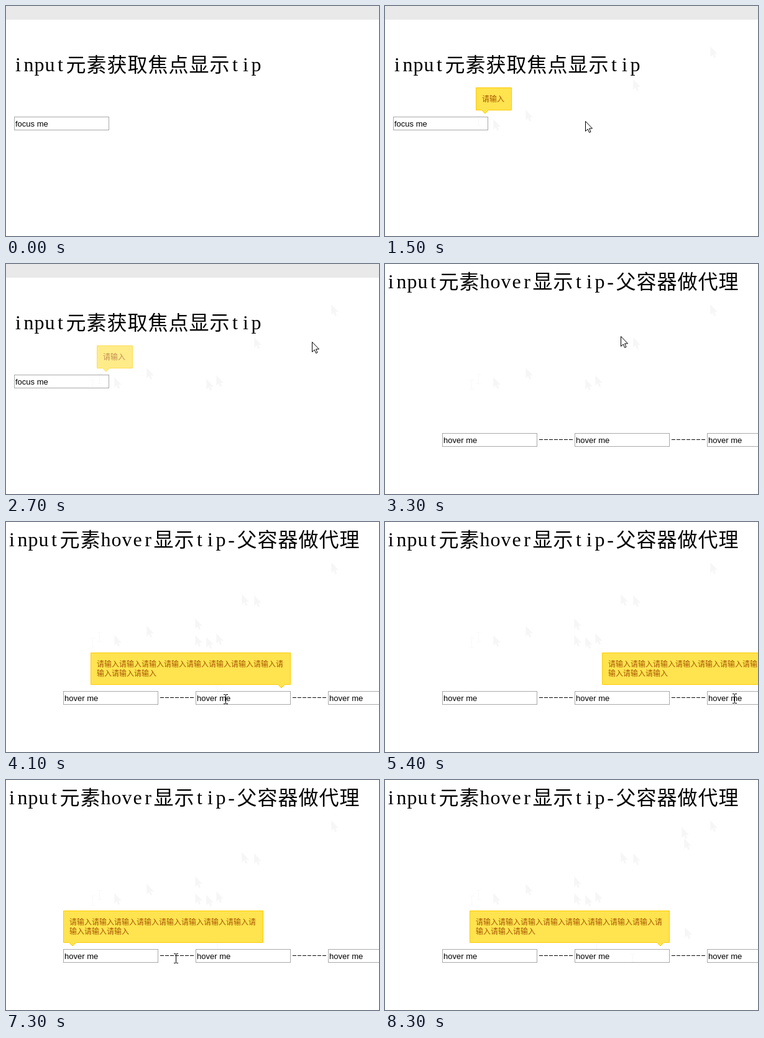
Animation of 600x370 px, one loop 8.8 s. Source, as an HTML page:

```html
<!DOCTYPE html>
<html lang="zh-CN">
<head>
<meta charset="utf-8">
<title>input tip</title>
<style>
html, body { margin: 0; width: 100%; height: 100%; overflow: hidden; background: #fff; }
svg { display: block; width: 600px; height: 370px; }
.title { font: 32px "Liberation Serif", "Noto Serif", serif; text-anchor: middle; }
.title .han { font: 32px "Noto Sans CJK SC", "Noto Sans CJK", sans-serif; }
.field rect { fill: #fff; stroke: #a9a9a9; }
.field text { font: 13px "Liberation Sans", Arial, sans-serif; }
.dash { stroke: #000; stroke-dasharray: 6 2; }
.tip path { fill: #ffe34f; stroke: #fc0; }
.tip text { font: 12px "Noto Sans CJK SC", "Noto Sans CJK", sans-serif; fill: #a65600; }
.ring { fill: none; stroke: #e5a83c; stroke-width: 2; }
.arrow { fill: #fff; stroke: #000; }
.beam { fill: none; stroke: #000; }
#ghosts { mix-blend-mode: multiply; }
#ghosts .arrow { fill: #f6f6f6; stroke: #f9f9f9; }
#ghosts .beam { stroke: #f8f8f8; }
</style>
</head>
<body>
<svg viewBox="0 0 600 370">
  <defs>
    <path id="arrow" d="M.5 .5V16.5L4.2 13L6.6 18.5L9 17.5L6.6 12H11.5Z"/>
    <path id="beam" d="M1 .5H4M5 .5H8M4.5 1V15M1 15.5H4M5 15.5H8"/>
  </defs>
  <rect width="600" height="370" fill="#fff"/>
  <g id="page1">
    <rect width="600" height="22" fill="#e9e9e9"/>
    <g class="title" data-x="11" data-y="105">input元素获取焦点显示tip</g>
    <g class="field" data-x="13" data-y="178">focus me</g>
    <rect id="ring" class="ring" x="13" y="178" width="153" height="22" rx="1"/>
    <g id="tip1" class="tip">
      <path d="M146.5 131.5H203.5V167.5H166.5L161 173L155.5 167.5H146.5Z"/>
      <text x="156" y="153.5">请输入</text>
    </g>
  </g>
  <g id="page2">
    <g class="title" data-x="1" data-y="39">input元素hover显示tip-父容器做代理</g>
    <g class="field" data-x="92" data-y="272">hover me</g>
    <path class="dash" d="M248 282.5H303M461 282.5H516"/>
    <g class="field" data-x="305" data-y="272">hover me</g>
    <g class="field" data-x="518" data-y="272">hover me</g>
    <g id="tip2" class="tip">
      <path id="bubble"/>
      <text x="10" y="232.5">请输入请输入请输入请输入请输入请输入请输入请输入请</text>
      <text x="10" y="247.5">输入请输入请输入</text>
    </g>
  </g>
  <g id="ghosts"></g>
  <g id="cursor"></g>
</svg>
<script>
const LOOP = 8800, CUT = 3300, STEP = 100;
const $ = id => document.getElementById(id);

function add(parent, tag, attrs, text) {
  const el = document.createElementNS("http://www.w3.org/2000/svg", tag);
  for (const k in attrs) el.setAttribute(k, attrs[k]);
  if (text) el.textContent = text;
  parent.append(el);
  return el;
}

// Full-width glyphs take 33px cells, half-width ones 17px.
document.querySelectorAll(".title").forEach(g => {
  const runs = g.textContent.match(/[ -~]+|[^ -~]+/g);
  let x = +g.dataset.x;
  g.textContent = "";
  for (const run of runs) {
    const han = run.charCodeAt(0) > 255, cell = han ? 33 : 17;
    const xs = [...run].map((_, i) => x + cell * (i + .5));
    add(g, "text", { x: xs.join(" "), y: +g.dataset.y + (han ? .5 : 0), class: han ? "han" : "" }, run);
    x += cell * run.length;
  }
});

document.querySelectorAll(".field").forEach(g => {
  const label = g.textContent, x = +g.dataset.x, y = +g.dataset.y;
  g.textContent = "";
  add(g, "rect", { x: x + .5, y: y + .5, width: 152, height: 21 });
  add(g, "text", { x: x + 2, y: y + 16 }, label);
});

// Pointer stops: time, x, y, shape (A arrow, B text beam, - hidden), * leaves a faint trace.
const stops = `100 523 65 A*|200 399 118 A*|300 226 167 A*|400 174 182 A*|500 150 176 B|600 146 177 B*
1300 215 190 A|1400 300 199 A|1500 322 185 A*|1700 290 199 A|1800 225 196 A|1900 175 190 A|2000 150 186 B
2100 135 186 B*|2400 230 185 A|2500 338 179 A*|2600 430 150 A|2700 492 125 A
3300 379 116 A*|3400 304 155 A*|3500 304 182 A*|3600 318 225 A|3700 336 263 B*|3800 343 270 B|3900 349 275 B
4100 349 277 B|4500 290 277 B|4600 230 277 B|4700 180 276 B
5200 300 276 B|5300 450 276 B|5400 558 276 B|5500 572 276 B|5700 577 280 B|5800 582 281 B
6300 540 281 B|6400 470 280 B|6500 420 279 B|6600 390 279 B|6800 300 279 B|6900 230 279 B|7000 190 279 B
7300 269 279 B|7400 330 279 B|7500 375 279 B|7600 394 279 B*
7800 482 237 A*|7900 481 94 A*|8000 477 76 A*|8100 520 50 A|8200 571 28 A|8300 0 0 -`
  .split(/[|\n]/).map(s => {
    const [t, x, y, kind] = s.trim().split(" ");
    return { t: +t, x, y, shape: { A: "arrow", B: "beam" }[kind[0]], trace: kind[1] === "*" };
  });

function pointer(parent, s) {
  return add(parent, "use", { href: "#" + s.shape, class: s.shape, transform: `translate(${s.x} ${s.y})` });
}
const traces = stops.map((s, i) => s.trace && { el: pointer($("ghosts"), s), from: stops[i + 1].t }).filter(Boolean);
const pointers = stops.map(s => s.shape && pointer($("cursor"), s));

// Tip on the second page: time, left edge, arrow position.
const hovers = [[4100, 136, 307], [4600, 92, 15], [5400, 349, 307], [6500, 136, 307], [7000, 92, 15], [7500, 136, 307]];

const show = (el, on) => el.style.display = on ? "" : "none";
const fade = (t, from) => Math.max(0, Math.min(1, 1 - (t - from) / 600));

function tipAlpha(t) {
  if (t < 800) return 0;
  return t < 2200 ? fade(t, 1500) : fade(t, 2500);
}

function draw(t) {
  show($("page1"), t < CUT);
  show($("page2"), t >= CUT);
  show($("ring"), (t >= 800 && t < 1500) || (t >= 2200 && t < 2500));
  $("tip1").style.opacity = tipAlpha(t);

  const hover = hovers.filter(h => h[0] <= t).pop();
  show($("tip2"), hover);
  if (hover) {
    const [, x, a] = hover;
    $("tip2").setAttribute("transform", `translate(${x} 0)`);
    $("bubble").setAttribute("d", `M.5 210.5H321.5V261.5H${a + 5.5}L${a} 267L${a - 5.5} 261.5H.5Z`);
  }

  const now = stops.filter(s => s.t <= t).length - 1;
  pointers.forEach((el, i) => el && show(el, i === now));
  traces.forEach(g => show(g.el, t >= g.from));
}

let start;
function tick(time) {
  start ??= time;
  draw(Math.floor((time - start) % LOOP / STEP) * STEP);
  requestAnimationFrame(tick);
}
draw(0);
requestAnimationFrame(tick);
</script>
</body>
</html>
```
